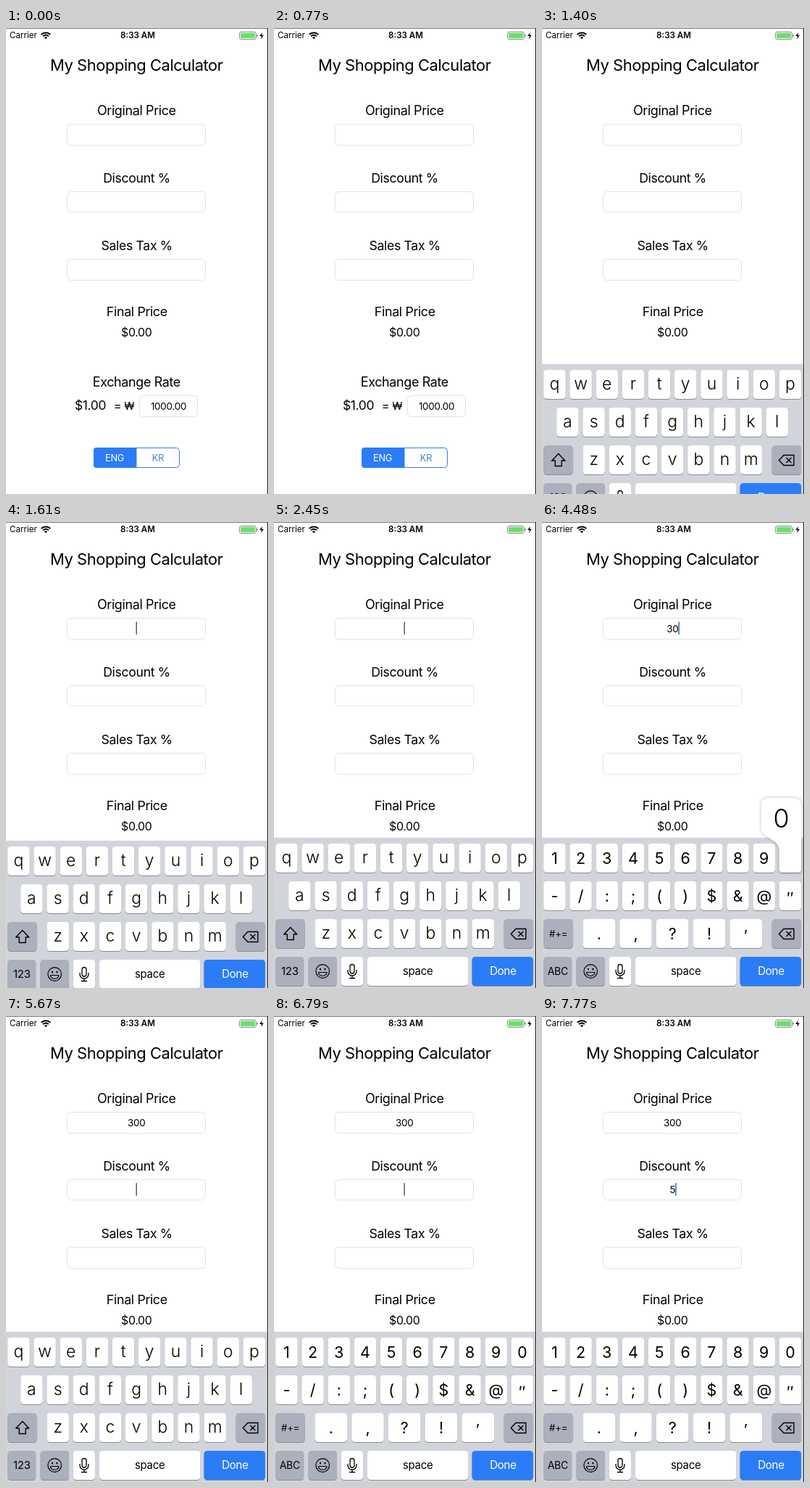
Recreate the animation shown at these times as an HTML page with a canvas. Size 362 by 642 pixels, loop 8000 ms.

```html
<!DOCTYPE html>
<html lang="en">
<head>
<meta charset="utf-8">
<title>My Shopping Calculator</title>
<style>
  html, body { margin: 0; width: 100%; height: 100%; overflow: hidden; background: #fff; }
  canvas { display: block; width: 362px; height: 642px; }
</style>
</head>
<body>
<canvas id="stage" width="362" height="642"></canvas>
<script>
const ctx = document.getElementById('stage').getContext('2d');
const W = 362, H = 642, LOOP = 8000, MID = 180.3;
const BLUE = '#2b7cf6', INK = '#000', KEY_GRAY = '#abb0bc';
const KEYBOARD_TOP = 435, KEY_H = 40, KEY_W = 30.4, PITCH = 36.17;

const LETTERS = ['qwertyuiop', 'asdfghjkl', 'zxcvbnm'];
const SYMBOLS = ['1234567890', '-/:;()$&@″', '.,?!′'];

const caretKeys = [
  [1470, 0], [1540, 1], [1680, 1], [1820, 0], [2240, 0], [2450, 1],
  [2660, 1], [2800, 0], [3220, 0], [3430, 1], [4900, 1], [5040, 0],
  [5180, 0], [5250, 1], [6020, 1], [6230, 0], [6510, 0], [6720, 1],
  [7000, 1], [7140, 0], [7420, 0], [7490, 1]
];
const presses = [
  { digit: 3, from: 3640, to: 3850 },
  { digit: 0, from: 4130, to: 4270 },
  { digit: 0, from: 4410, to: 4550 },
  { digit: 5, from: 7280, to: 7490 }
];
const REFOCUS = 5180;

function interpolate(keys, t) {
  if (t <= keys[0][0]) return keys[0][1];
  for (let i = 1; i < keys.length; i++) {
    const [t0, v0] = keys[i - 1], [t1, v1] = keys[i];
    if (t < t1) return v0 + (v1 - v0) * (t - t0) / (t1 - t0);
  }
  return keys[keys.length - 1][1];
}

function text(str, x, y, size, { color = INK, weight = 400, align = 'center', track = -0.022 } = {}) {
  ctx.font = `${weight} ${size}px Inter, sans-serif`;
  ctx.letterSpacing = `${track * size}px`;
  ctx.textAlign = align;
  ctx.fillStyle = color;
  ctx.fillText(str, x, y);
  return ctx.measureText(str).width;
}

function box(x, y, w, h, r, fill, stroke) {
  ctx.beginPath();
  ctx.roundRect(x, y, w, h, r);
  if (fill) { ctx.fillStyle = fill; ctx.fill(); }
  if (stroke) { ctx.strokeStyle = stroke; ctx.lineWidth = 1; ctx.stroke(); }
}

function polyline(points, close) {
  ctx.beginPath();
  points.forEach(([x, y]) => ctx.lineTo(x, y));
  if (close) ctx.closePath();
}

function outline(width = 1.4, color = INK) {
  ctx.lineWidth = width;
  ctx.strokeStyle = color;
  ctx.stroke();
}

function statusBar() {
  text('Carrier', 5, 14.3, 11.6, { align: 'left', track: 0 });
  text('8:33 AM', 182, 14.3, 11.6, { weight: 600, track: 0 });
  ctx.save();
  ctx.beginPath();
  ctx.moveTo(55, 15.3);
  ctx.arc(55, 15.3, 12, -Math.PI * 0.75, -Math.PI * 0.25);
  ctx.clip();
  for (const r of [8.8, 5.5]) {
    ctx.beginPath();
    ctx.arc(55, 15.3, r, Math.PI, 0);
    outline(2);
  }
  ctx.beginPath();
  ctx.arc(55, 15.3, 3, Math.PI, 0);
  ctx.fillStyle = INK;
  ctx.fill();
  ctx.restore();

  box(322.5, 5.5, 23, 10, 2.5, '#fff', '#888');
  box(324, 7, 20, 7, 1.2, '#69e069');
  box(346.5, 8.7, 1.4, 3.6, 0.7, '#888');
  polyline([[354, 6], [350.3, 11], [353, 11], [352, 15.3], [356, 9.8], [353.3, 9.8]], true);
  ctx.fillStyle = INK;
  ctx.fill();
}

const field = (x, y, w, h = 29) => box(x + 0.5, y + 0.5, w, h, 5, '#fff', '#e2e2e2');

function form() {
  text('My Shopping Calculator', MID, 59, 22);
  text('Original Price', MID, 120.3, 18);
  text('Discount %', MID + 0.2, 212.6, 17.8);
  text('Sales Tax %', MID + 0.4, 306, 17.8);
  text('Final Price', MID + 0.5, 396.8, 17.9);
  text('$0.00', MID, 425, 16);
  text('Exchange Rate', MID, 494.3, 18);
  text('$1.00', 95, 526, 17.5, { align: 'left' });
  text('=', 154, 526, 16.5);
  text('₩', 170.2, 525.5, 14.5);
  field(84, 132, 191);
  field(84, 225, 191, 28);
  field(84, 318, 191);
  field(184, 506, 80);
  text('1000.00', 224.5, 525.5, 13.5);

  box(121.5, 578.5, 118, 27, 4, '#fff', BLUE);
  box(121, 578, 59.5, 28, [4, 0, 0, 4], BLUE);
  text('ENG', 150, 596.6, 12.8, { color: '#fff' });
  text('KR', 210, 596.6, 12.8, { color: '#3c87c4' });
}

function typed(t) {
  const done = presses.filter(p => t >= p.to);
  const join = list => list.map(p => p.digit).join('');
  return [join(done.filter(p => p.to < REFOCUS)), join(done.filter(p => p.to > REFOCUS))];
}

function entries(t) {
  const values = typed(t), active = t < REFOCUS ? 0 : 1;
  values.forEach((value, i) => {
    const y = 146.8 + 92.6 * i;
    const width = value ? text(value, MID, y + 5, 13.5) : 0;
    if (i !== active) return;
    ctx.globalAlpha = interpolate(caretKeys, t);
    ctx.fillStyle = value ? '#4262c4' : '#51577f';
    ctx.fillRect(MID - 0.8 + width / 2 + (value ? 0.8 : 0), y - 9.3, 1.5, 17.5);
    ctx.globalAlpha = 1;
  });
}

function key(x, y, w, fill = '#fff') {
  box(x, y + 1, w, KEY_H, 4.5, '#898c92');
  box(x, y, w, KEY_H, 4.5, fill);
}

function glyphKey(ch, x, y, w, letters) {
  key(x, y, w);
  const low = ch === '″' || ch === '′' ? 31 : 27.5;
  if (letters) text(ch, x + w / 2, y + 27, 23, { weight: 300, track: 0 });
  else text(ch, x + w / 2, y + low, 21.5, { track: 0 });
}

function shiftIcon(x, y) {
  polyline([[0, -9], [9, 0.5], [4.5, 0.5], [4.5, 8], [-4.5, 8], [-4.5, 0.5], [-9, 0.5]]
    .map(([a, b]) => [x + a, y + b]), true);
  outline();
}

function deleteIcon(x, y) {
  ctx.lineJoin = 'round';
  polyline([[-10.5, 0], [-4, -7], [10, -7], [10, 7], [-4, 7]].map(([a, b]) => [x + a, y + b]), true);
  outline();
  for (const s of [-1, 1]) {
    polyline([[x - 0.5, y - 3.5 * s], [x + 6.5, y + 3.5 * s]]);
    outline();
  }
}

function emojiIcon(x, y) {
  ctx.beginPath();
  ctx.arc(x, y, 9.3, 0, Math.PI * 2);
  outline(1.2);
  ctx.fillStyle = INK;
  for (const s of [-3.2, 3.2]) {
    ctx.beginPath();
    ctx.ellipse(x + s, y - 3, 1.1, 1.6, 0, 0, Math.PI * 2);
    ctx.fill();
  }
  ctx.beginPath();
  ctx.ellipse(x, y + 1.5, 5.8, 4.8, 0, 0, Math.PI);
  ctx.closePath();
  outline(1.1);
}

function micIcon(x, y) {
  box(x - 3, y - 9.5, 6, 12.5, 3);
  outline(1.3);
  ctx.beginPath();
  ctx.moveTo(x - 6, y - 2);
  ctx.lineTo(x - 6, y);
  ctx.arc(x, y, 6, Math.PI, 0, true);
  ctx.lineTo(x + 6, y - 2);
  ctx.moveTo(x, y + 6);
  ctx.lineTo(x, y + 9.5);
  ctx.moveTo(x - 4, y + 9.5);
  ctx.lineTo(x + 4, y + 9.5);
  outline(1.3);
}

function popup(digit, top) {
  const x = 2.2 + PITCH * ((digit + 9) % 10), right = x + KEY_W;
  const y = top - 55, keyTop = top + 8;
  const r = Math.min(right + 14, 358.5), l = digit ? x - 14 : x - 25;
  ctx.save();
  ctx.beginPath();
  ctx.moveTo(l + 9, y);
  ctx.arcTo(r, y, r, y + 9, 9);
  ctx.lineTo(r, y + 42);
  ctx.bezierCurveTo(r, y + 56, right, y + 56, right, y + 72);
  ctx.arcTo(right, keyTop + KEY_H, x, keyTop + KEY_H, 4.5);
  ctx.arcTo(x, keyTop + KEY_H, x, y + 72, 4.5);
  ctx.lineTo(x, y + 72);
  ctx.bezierCurveTo(x, y + 56, l, y + 56, l, y + 42);
  ctx.arcTo(l, y, l + 9, y, 9);
  ctx.closePath();
  ctx.shadowColor = 'rgba(0,0,0,.28)';
  ctx.shadowBlur = 4;
  ctx.fillStyle = '#fff';
  ctx.fill();
  ctx.restore();
  text(String(digit), (l + r) / 2, y + 41, 36, { weight: 300, track: 0 });
}

function keyboard(t) {
  if (t < 1400) return;
  const slide = t < 2030 ? 28 * Math.exp(-(t - 1400) / 108) : 0;
  const top = KEYBOARD_TOP + slide;
  const letters = t < 2730 || (t >= REFOCUS && t < 6580);
  const rows = letters ? LETTERS : SYMBOLS;
  const rowY = i => top + 8 + 52 * i;

  ctx.fillStyle = '#d1d5db';
  ctx.fillRect(0, top, W, H - top);

  rows.forEach((row, i) => {
    const wide = !letters && i === 2;
    const left = i === 2 ? 56.5 : letters && i === 1 ? 20.2 : 2.2;
    [...row].forEach((ch, n) =>
      glyphKey(ch, left + n * (wide ? 50.75 : PITCH), rowY(i), wide ? 44.5 : KEY_W, letters));
  });

  const y3 = rowY(2), y4 = rowY(3);
  key(2.2, y3, 40.5, KEY_GRAY);
  if (letters) shiftIcon(22.7, y3 + 20.5);
  else text('#+=', 22.7, y3 + 24.5, 13, { track: 0 });
  key(317.6, y3, 40.5, KEY_GRAY);
  deleteIcon(338, y3 + 20.5);

  key(2.2, y4, 39, KEY_GRAY);
  text(letters ? '123' : 'ABC', 21.8, y4 + 25.3, letters ? 15 : 14);
  key(47.5, y4, 39.5, KEY_GRAY);
  emojiIcon(67.2, y4 + 20);
  key(92.7, y4, KEY_W);
  micIcon(108, y4 + 20);
  key(129, y4, 139.5);
  text('space', 198.7, y4 + 25.2, 15);
  key(273.6, y4, 84.5, BLUE);
  text('Done', 316.5, y4 + 25.2, 15.2, { color: '#fff' });

  const held = presses.find(p => t >= p.from && t < p.to);
  if (held) popup(held.digit, top);
}

function frameEdge() {
  ctx.fillStyle = '#777';
  ctx.fillRect(0, 0, W, 1);
  ctx.fillStyle = '#222';
  ctx.fillRect(W - 1, 0, 1, H);
}

function draw(now) {
  const t = now % LOOP;
  ctx.fillStyle = '#fff';
  ctx.fillRect(0, 0, W, H);
  statusBar();
  form();
  entries(t);
  keyboard(t);
  frameEdge();
}

let start;
function tick(now) {
  start ??= now;
  draw(now - start);
  requestAnimationFrame(tick);
}
draw(0);
requestAnimationFrame(tick);
</script>
</body>
</html>
```
